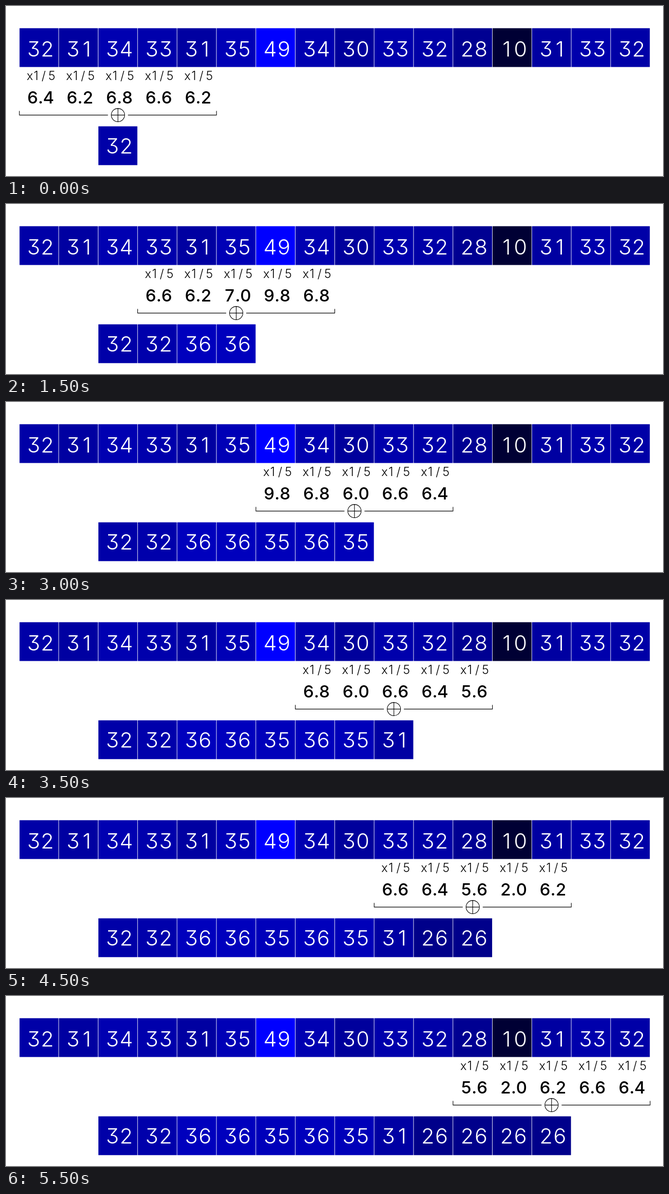
Write an HTML page that moves like this. It is 1280 px wide and 333 px high and loops after 6 s.

```html
<!DOCTYPE html>
<html lang="en">
<head>
<meta charset="utf-8">
<title>Moving average</title>
<style>
  html, body { margin: 0; width: 100%; height: 100%; overflow: hidden; background: #fff; }
  svg { display: block; width: 100%; height: 100%; }
  text {
    font-family: Inter, "Open Sans", sans-serif;
    font-feature-settings: "cv09", "calt" 0;
    text-anchor: middle;
  }
  .cell { font-size: 41.5px; font-weight: 350; fill: #fff; }
  .weight { font-size: 23.5px; font-weight: 270; }
  .part { font-size: 33px; font-weight: 500; }
  path { fill: none; stroke: #000; stroke-width: 1.1; }
</style>
</head>
<body>
<svg viewBox="0 0 1280 333" preserveAspectRatio="none">
  <g id="input"></g>
  <g id="output"></g>
  <g id="kernel"></g>
</svg>
<script>
const data = [32, 31, 34, 33, 31, 35, 49, 34, 30, 33, 32, 28, 10, 31, 33, 32];
const SIZE = 5, STEP = 500, PITCH = 76.8;
const count = data.length - SIZE + 1;
const max = Math.max(...data);
const left = i => 25.6 + PITCH * i;
const get = id => document.getElementById(id);

// Each character is centred on its own offset within the column.
const label = (kind, i, y, str, offsets) =>
  `<text class="${kind}" y="${y}" x="${offsets.map(o => (left(i) + o).toFixed(2)).join(" ")}">${str}</text>`;

const cell = (i, y, base, v) =>
  `<rect x="${left(i) + 0.8}" y="${y}" width="75.9" height="76" fill="rgb(0,0,${Math.round(255 * v / max)})"/>` +
  label("cell", i, base, Math.floor(v), [28.2, 55]);

const term = (v, i) =>
  label("weight", i, 144.6, "x1/5", [20.8, 33, 47.7, 63.6]) +
  label("part", i, 190.6, (v / SIZE).toFixed(1), [26.2, 41.8, 57.2]);

function bracket(k) {
  const a = left(k) + 0.5, b = left(k + SIZE) + 0.5, c = (a + b) / 2, y = 213.6, r = 13;
  return `<path d="M${a} 205.6V${y}H${c - 19.5}M${c + 19.5} ${y}H${b}V205.6
    M${c - r} ${y}h${2 * r}M${c} ${y - r}v${2 * r}
    M${c - r} ${y}a${r} ${r} 0 1 1 ${2 * r} 0a${r} ${r} 0 1 1 ${-2 * r} 0"/>`;
}

const means = Array.from({ length: count }, (_, k) =>
  data.slice(k, k + SIZE).reduce((a, b) => a + b) / SIZE);

get("input").innerHTML = data.map((v, i) => cell(i, 43.5, 98.5, v)).join("");

let shown = -1;
function draw(now) {
  const k = Math.floor(now / STEP) % count;
  if (k !== shown) {
    shown = k;
    get("output").innerHTML = means.slice(0, k + 1).map((v, i) => cell(i + 2, 235.7, 288.5, v)).join("");
    get("kernel").innerHTML = data.slice(k, k + SIZE).map((v, j) => term(v, k + j)).join("") + bracket(k);
  }
}

let start;
function tick(now) {
  start ??= now;
  draw(now - start);
  requestAnimationFrame(tick);
}
draw(0);
requestAnimationFrame(tick);
</script>
</body>
</html>
```
